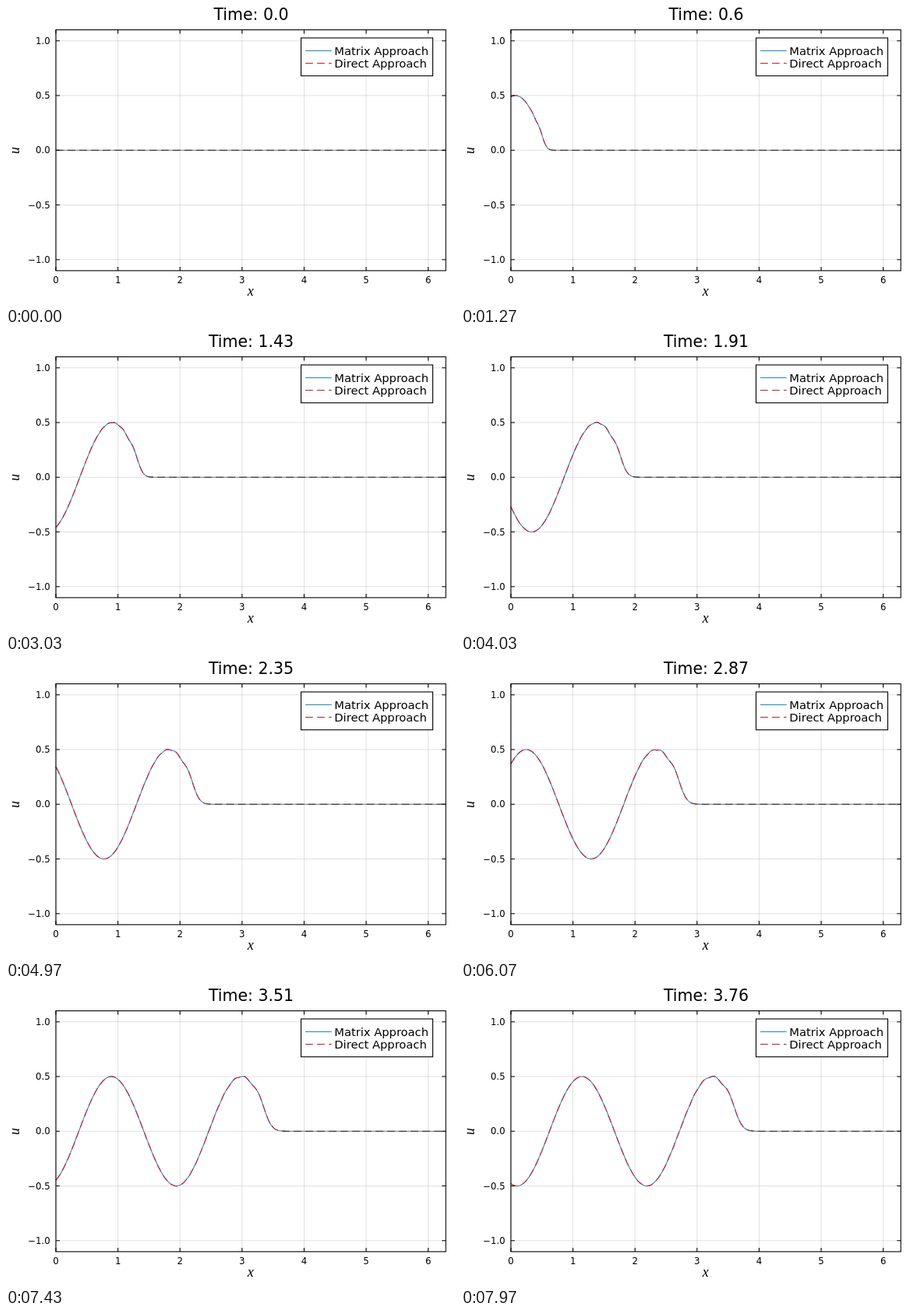
An HTML page for the animation above (8 s loop, 576x384 px).

```html
<!DOCTYPE html>
<html lang="en">
<head>
<meta charset="utf-8">
<title>Travelling wave</title>
<style>
  html, body { margin: 0; width: 100%; height: 100%; overflow: hidden; background: #fff; }
  svg { display: block; width: 576px; height: 384px; }
  text { font-family: "DejaVu Sans", sans-serif; fill: #000; }
  #title { font-size: 20.5px; text-anchor: middle; }
  .tick { font-size: 11.7px; }
  .legend text { font-size: 14.7px; }
  .math { font: italic 18px "Liberation Serif", serif; text-anchor: middle; }
  path, rect, line { fill: none; stroke-width: 1.1; }
  .grid { stroke: #000; stroke-opacity: .12; stroke-width: 1; }
  .axis { stroke: #000; }
  .dashed { stroke-dasharray: 9.8 5.2; }
</style>
</head>
<body>
<svg viewBox="0 0 576 384">
  <defs>
    <!-- Both lines turn dark where they lie on the zero level. -->
    <linearGradient id="solidInk" gradientUnits="userSpaceOnUse" y1="0" y2="0">
      <stop offset="0" stop-color="#0d93d8"/><stop offset="1" stop-color="#777"/>
    </linearGradient>
    <linearGradient id="dashInk" gradientUnits="userSpaceOnUse" y1="0" y2="0">
      <stop offset="0" stop-color="#e0141f"/><stop offset="1" stop-color="#2b2b2b"/>
    </linearGradient>
  </defs>
  <path id="grid" class="grid"/>
  <g id="labels"></g>
  <path id="matrix" stroke="url(#solidInk)"/>
  <path id="direct" class="dashed" stroke="url(#dashInk)"/>
  <path id="ticks" class="axis"/>
  <rect class="axis" x="64" y="30.6" width="500.2" height="309.3"/>
  <text id="title" x="314.5" y="18.2"></text>
  <text class="math" x="313.7" y="372">x</text>
  <text class="math" transform="translate(17 185.5) rotate(-90)">u</text>
  <g class="legend">
    <rect class="axis" x="378.5" y="41" width="169" height="48.7" style="fill:#fff"/>
    <line x1="384" x2="417.7" y1="57.5" y2="57.5" stroke="#1f86bd"/>
    <line class="dashed" x1="384" x2="417.7" y1="73.5" y2="73.5" stroke="#b8202c"/>
    <text x="421.3" y="62.8">Matrix Approach</text>
    <text x="421.3" y="78.9">Direct Approach</text>
  </g>
</svg>
<script>
const POINTS = 400, STEPS = 240, LOOP = 8000;
const h = 2 * Math.PI / (POINTS - 1);
const left = 64, right = 564.2, top_ = 30.6, bottom = 339.9;
const px = x => left + x * (right - left) / (2 * Math.PI);
const py = u => 185.25 - u * 140.5;
const el = id => document.getElementById(id);

function drawAxes() {
  let grid = '', ticks = '', labels = '';
  const label = (x, y, anchor, str) =>
    labels += `<text class="tick" x="${x}" y="${y}" text-anchor="${anchor}">${str}</text>`;
  for (let i = 0; i <= 6; i++) {
    const x = px(i);
    grid += `M${x} ${top_}V${bottom}`;
    ticks += `M${x} ${bottom}v-5M${x} ${top_}v5`;
    label(x, 355.5, 'middle', i);
  }
  for (let i = -2; i <= 2; i++) {
    const y = py(i / 2);
    grid += `M${left} ${y}H${right}`;
    ticks += `M${left} ${y}h5M${right} ${y}h-5`;
    label(56.6, y + 4.2, 'end', (i / 2).toFixed(1).replace('-', '\u2212'));
  }
  el('grid').setAttribute('d', grid);
  el('ticks').setAttribute('d', ticks);
  el('labels').innerHTML = labels;
}

// u_t + u_x = 0 with u(0, t) = sin(3t) / 2, central differences in space.
function slope(u, t) {
  return u.map((v, i) =>
    i === 0 ? 1.5 * Math.cos(3 * t) :
    i === POINTS - 1 ? (u[i - 1] - v) / h :
    (u[i - 1] - u[i + 1]) / (2 * h));
}

function rk4(u, t) {
  const shifted = (k, s) => u.map((v, i) => v + s * k[i]);
  const a = slope(u, t);
  const b = slope(shifted(a, h / 2), t + h / 2);
  const c = slope(shifted(b, h / 2), t + h / 2);
  const d = slope(shifted(c, h), t + h);
  return u.map((v, i) => v + h / 6 * (a[i] + 2 * b[i] + 2 * c[i] + d[i]));
}

function snapshot(u, t) {
  let front = POINTS - 1;
  while (front > 0 && Math.abs(u[front]) < 0.004) front--;
  const rounded = Math.round(t * 100) / 100;
  return {
    path: 'M' + Array.from(u, (v, i) => px(i * h).toFixed(2) + ' ' + py(v).toFixed(2)).join('L'),
    front: front ? px(front * h) : left - 1,
    title: 'Time: ' + (Number.isInteger(rounded) ? rounded.toFixed(1) : rounded)
  };
}

function simulate() {
  const states = [];
  let u = new Float64Array(POINTS);
  for (let n = 0; n < STEPS; n++) {
    states.push(snapshot(u, n * h));
    u = rk4(u, n * h);
  }
  return states;
}

drawAxes();
const states = simulate();
let shown = -1;

function show(n) {
  if (n === shown) return;
  shown = n;
  const { path, front, title } = states[n];
  el('matrix').setAttribute('d', path);
  el('direct').setAttribute('d', path);
  for (const id of ['solidInk', 'dashInk']) {
    el(id).setAttribute('x1', front);
    el(id).setAttribute('x2', front + 0.1);
  }
  el('title').textContent = title;
}

// 30 steps per second, each starting on a whole hundredth.
function tick() {
  const hundredths = Math.floor(performance.now() % LOOP / 10);
  show(Math.floor((3 * hundredths + 1) / 10));
  requestAnimationFrame(tick);
}
tick();
</script>
</body>
</html>
```
